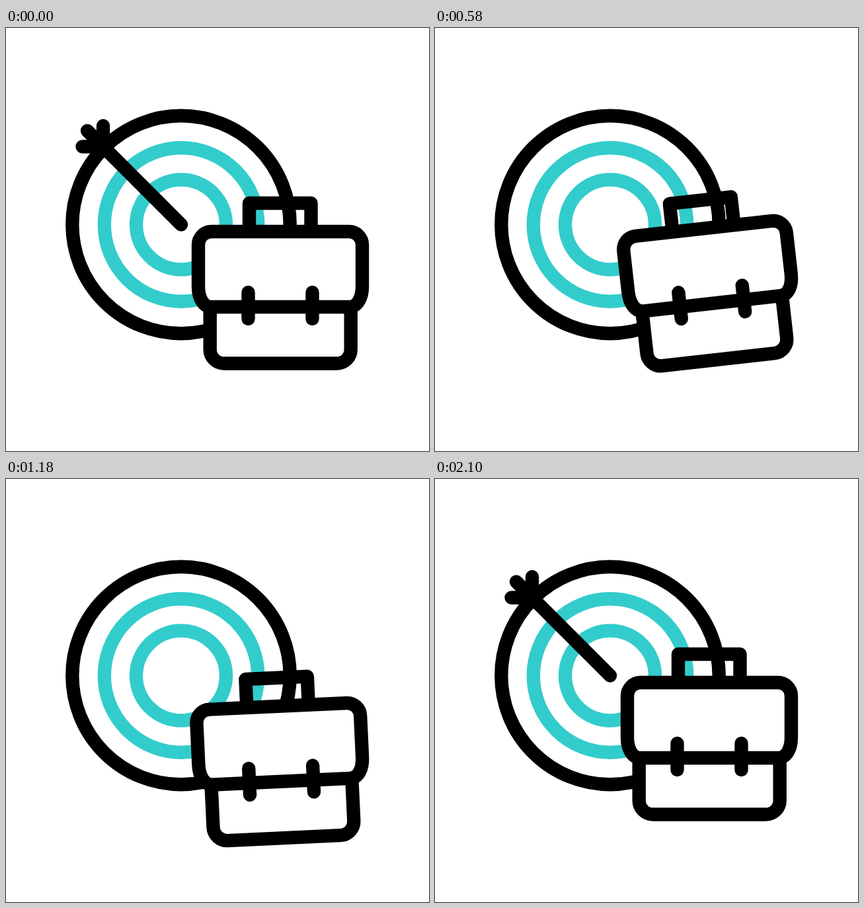
These frames come from a looping animation (640x640 px, 2.4 s). An HTML page with a canvas:

```html
<!DOCTYPE html>
<html lang="en">
<head>
<meta charset="utf-8">
<title>Target and briefcase</title>
<style>
html, body { margin: 0; width: 100%; height: 100%; overflow: hidden; background: #fff; }
canvas { display: block; width: 640px; height: 640px; }
</style>
</head>
<body>
<canvas id="stage" width="640" height="640"></canvas>
<script>
const ctx = document.getElementById('stage').getContext('2d');
const LOOP = 2400, STEP = 20;
const TEAL = '#33cccc', BLACK = '#000';
const RAD = Math.PI / 180;

const smooth = f => f * f * (3 - 2 * f);
const fall = f => f * f;

// Keys are [time, value, ease into this key].
const caseTilt = [[0, 0], [360, -18], [920, 16], [1320, -10], [1660, 5], [2100, 0]];
const caseDrop = [[0, 0], [350, 54], [720, -33], [1065, 54], [1420, -20], [1760, 15], [2100, 0]];
const arrowX = [[0, 265], [890, 265], [1120, -40], [1250, -40], [1580, 265]];
const arrowY = [[0, 297.5], [550, 666, fall], [620, 700], [960, 0], [1110, -30], [1250, 122], [1580, 297.5]];
const arrowTurn = [[0, 0], [520, -135], [700, -135], [1100, 0], [1460, 0], [1640, 9.5], [1860, 0]];

function at(keys, t) {
  for (let i = 1; i < keys.length; i++) {
    const [t0, a] = keys[i - 1], [t1, b, ease = smooth] = keys[i];
    if (t < t1) return a + (b - a) * ease((t - t0) / (t1 - t0));
  }
  return keys[keys.length - 1][1];
}

function ring(r, color) {
  ctx.strokeStyle = color;
  ctx.beginPath();
  ctx.arc(265, 297.5, r, 0, 2 * Math.PI);
  ctx.stroke();
}

function shape(d, filled) {
  const p = new Path2D(d);
  if (filled) ctx.fill(p);
  ctx.stroke(p);
}

// Places a part by its pivot, turned by some degrees.
function posed(x, y, deg, draw) {
  ctx.save();
  ctx.translate(x, y);
  ctx.rotate(deg * RAD);
  draw();
  ctx.restore();
}

function arrow() {
  shape('M0 0L-142 -142');
  shape('M-118 -149.5V-118H-149.5');
}

function briefcase() {
  ctx.translate(-415, -386);
  shape('M368 308V265H461.5V308');
  shape('M308.7 422V486.5a21 21 0 0 0 21 21H500.7a21 21 0 0 0 21 -21V422', true);
  shape('M311 308H519a20 20 0 0 1 20 20V391C539 408 532 422 519 422H311C298 422 291 408 291 391V328a20 20 0 0 1 20 -20Z', true);
  for (const x of [366.5, 463.5]) shape(`M${x} 400V440`);
}

function draw(t) {
  ctx.fillStyle = '#fff';
  ctx.fillRect(0, 0, 640, 640);
  ctx.lineWidth = 20.4;
  ctx.lineCap = ctx.lineJoin = 'round';
  ring(68, TEAL);
  ring(116.2, TEAL);
  ring(164.7, BLACK);
  posed(at(arrowX, t), at(arrowY, t), at(arrowTurn, t), arrow);
  posed(415, 386 + at(caseDrop, t), at(caseTilt, t), briefcase);
}

const start = performance.now();
function tick() {
  const t = (performance.now() - start) % LOOP;
  draw(Math.floor(t / STEP) * STEP);
  requestAnimationFrame(tick);
}
tick();
</script>
</body>
</html>
```
